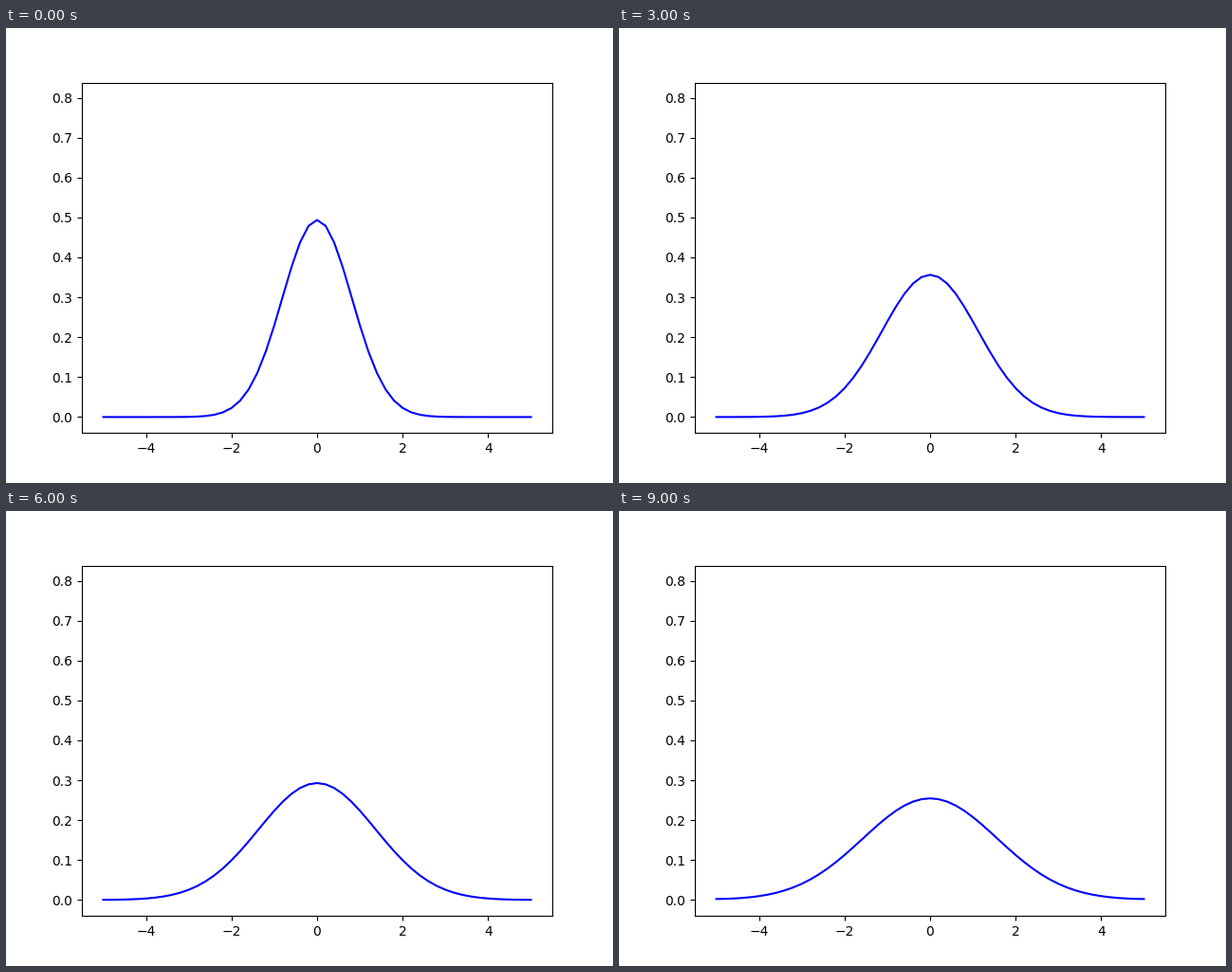
These frames come from a looping animation (640 px wide and 480 px high, 10 s). A matplotlib script:

```python
import numpy as np
import matplotlib.pyplot as plt
from matplotlib.animation import FuncAnimation

N = 51
FRAMES = 10
STEPS = 10        # diffusion steps per frame
DT = 0.01
SIGMA = 0.5

x = np.linspace(-5, 5, N)
dx = x[1] - x[0]
start = np.exp(-x**2 / (2 * SIGMA**2)) / np.sqrt(2 * np.pi * SIGMA**2)


def diffuse(u, steps):
    """Explicit heat equation on a periodic grid."""
    r = DT / dx**2
    for _ in range(steps):
        u = u + r * (np.roll(u, 1) - 2 * u + np.roll(u, -1))
    return u


fig, ax = plt.subplots(figsize=(6.4, 4.8), dpi=100)
line, = ax.plot(x, start, "b-")
ax.set_xlim(ax.get_xlim())
ax.set_ylim(ax.get_ylim())


def update(i):
    line.set_ydata(diffuse(start, (i + 2) * STEPS))
    return line,


anim = FuncAnimation(fig, update, frames=FRAMES, interval=1000,
                     repeat=True, repeat_delay=0)
plt.show()
```
